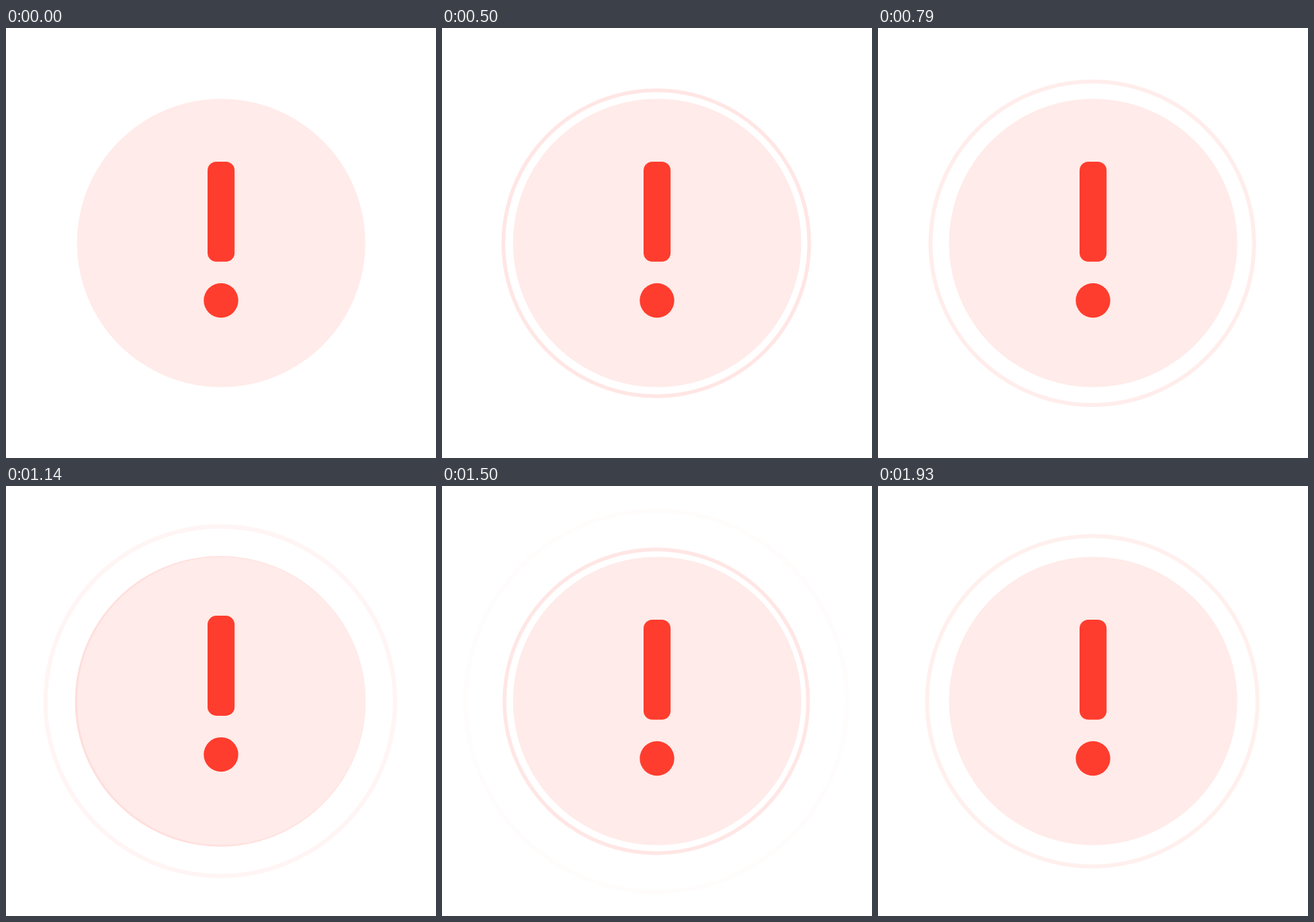
An HTML page for the animation above (2.57 s loop, 640 px wide and 640 px high).

```html
<!DOCTYPE html>
<html lang="en">
<head>
<meta charset="utf-8">
<title>Alert pulse</title>
<style>
  html, body { margin: 0; width: 100%; height: 100%; overflow: hidden; background: #fff; }
  svg { display: block; width: 100%; height: 100%; }
  .ring { fill: none; stroke: #ff3d2e; }
  .disc { fill: #ffebe9; }
  .mark { fill: #ff3d2e; }
</style>
</head>
<body>
<svg viewBox="0 0 640 640">
  <circle class="ring" cx="318.9" cy="320.4"/>
  <circle class="ring" cx="318.9" cy="320.4"/>
  <circle class="disc" cx="320.2" cy="320" r="214.5"/>
  <g class="mark">
    <rect x="300" y="199" width="40.2" height="148.8" rx="13"/>
    <circle cx="320" cy="405.5" r="25.7"/>
  </g>
</svg>
<script>
  const LOOP = 2570;
  const FPS = 14;
  const LAST = 27;
  const RING_STARTS = [0, 1040];
  const RING_LIFE = 1600;
  const HOP = { every: 1000, time: 250, height: 6 };

  const rings = document.querySelectorAll('.ring');
  const mark = document.querySelector('.mark');

  const stepTime = k => Math.round(k * 100 / FPS) * 10;

  // Hold each pose until the next step; the last one rests until the loop ends.
  function snap(t) {
    let k = Math.min(LAST, Math.floor(t * FPS / 1000) + 1);
    while (stepTime(k) > t) k--;
    return stepTime(k);
  }

  function drawRing(ring, age) {
    const alive = age > 0 && age < RING_LIFE;
    ring.style.opacity = alive ? 0.18 * (1 - age / RING_LIFE) : 0;
    if (!alive) return;
    const outer = 213.5 + 0.026 * age + 1.55e-5 * age * age;
    const width = outer * 0.024;
    ring.setAttribute('r', outer - width / 2);
    ring.setAttribute('stroke-width', width);
  }

  function hop(t) {
    const p = (t % HOP.every) / HOP.time;
    return p < 1 ? -HOP.height * Math.sin(Math.PI * p) : 0;
  }

  function draw(now) {
    const t = snap(now % LOOP);
    rings.forEach((ring, i) => drawRing(ring, t - RING_STARTS[i]));
    mark.setAttribute('transform', `translate(0 ${hop(t)})`);
  }

  let start = null;
  function tick(now) {
    if (start === null) start = now;
    draw(now - start);
    requestAnimationFrame(tick);
  }

  draw(0);
  requestAnimationFrame(tick);
</script>
</body>
</html>
```
